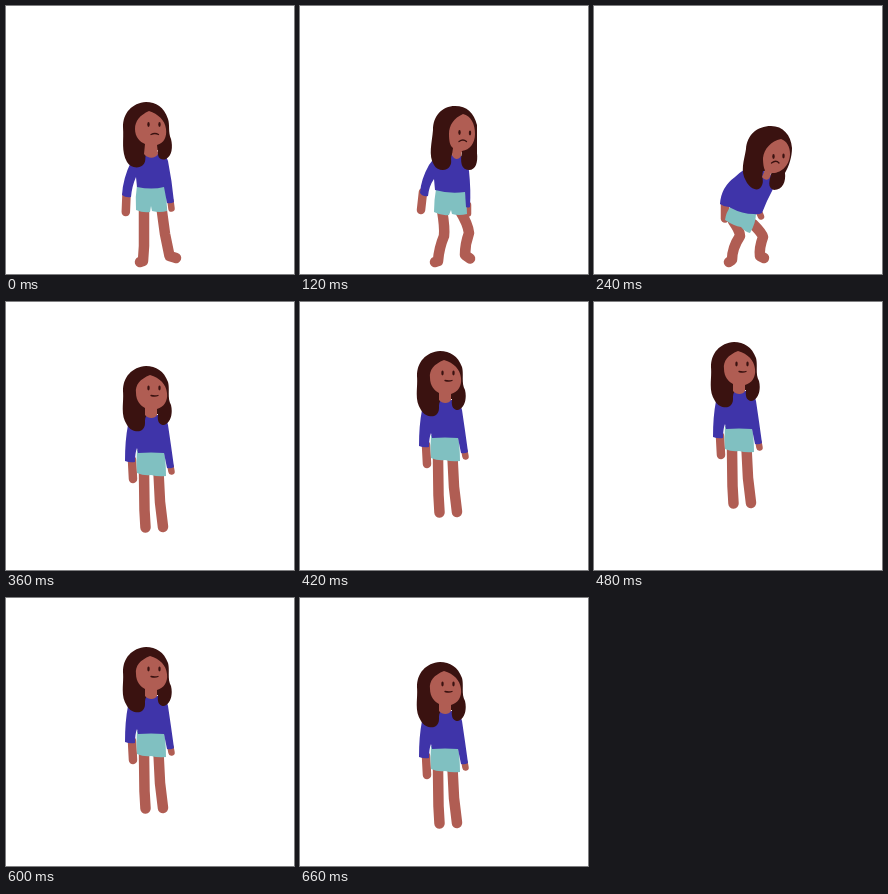
These frames come from a looping animation (288x268 px, 720 ms). An HTML page:

```html
<!DOCTYPE html>
<html lang="en">
<head>
<meta charset="utf-8">
<title>Jump</title>
<style>
  html, body { margin: 0; width: 100%; height: 100%; overflow: hidden; background: #fff; }
  svg { display: block; width: 100vw; height: 100vh; }
</style>
</head>
<body>
<svg id="stage" viewBox="0 0 288 268"></svg>
<script>
const SKIN = '#b05d53', HAIR = '#3a1210', SWEATER = '#3f34a9', SHORTS = '#80c0c1';
const LOOP = 720;

const poses = {
  stand: {
    legs: ['M138 202L138 240L137 255L134 256', 'M155.500 202L159 228L163.500 250L170 252'],
    hands: ['M120.500 189L119.800 206', 'M164.500 195L165.500 202.500'],
    shorts: 'M131 179L159 180Q161 192 161 205Q154 207 146 205L145 200L144 206Q137 207 130 204Q129 191 131 179Z',
    sweater: 'M139 146L152 146Q160 148 162 155Q166 175 168 196Q165 198 161 197L158 181Q146 184 131 181L130 171Q126 180 125 191Q120 192 116 189Q117 172 125 156Q131 148 139 146Z',
    hair: 'M140 96C126 97 117 107 117 121C118 135 115 145 121 156C124 162 133 163 137 159C141 155 138 151 141 146L152 144C151 151 154 155 160 153C166 150 167 141 165 133C162 126 164 119 162 113C158 101 150 96 140 96Z',
    face: 'M143 105C134 109 129 115 129 123C129 131 134 136 139 138L138 148C142 153 149 153 152 148L151 139C158 137 161 131 160 123C159 114 152 108 143 105Z',
    eyes: [142.5, 118.5, 153.5, 118.5],
    mouth: 'M145 128.500Q149 126.500 152.500 128.500'
  },
  dip: {
    legs: ['M142 204Q145 222 144 230Q139 242 138 255L135 256', 'M160 205Q168 218 169 227Q165 238 165 249L170 252.500'],
    hands: ['M123 186L121 204', 'M168 199L168 207.500'],
    shorts: 'M136 183L165 184Q167 196 167 208Q159 210 152 208L151 204L149 209Q141 210 134 206Q134 194 136 183Z',
    sweater: 'M150 149L162 150Q168 156 169 165Q171 184 170 201Q168 202 166 201L165 186Q149 188 135 184L134 173Q129 180 128 190Q123 191 120 187Q121 173 129 159Q135 149 150 149Z',
    hair: 'M155 100C142 100 133 110 133 124C132 137 128 149 134 159C137 165 147 166 150 160C153 155 149 153 153 147L162 146C160 155 161 164 169 164C176 164 178 156 177 147L177 119C174 107 167 100 155 100Z',
    face: 'M163 108C154 112 149 119 149 128C149 135 150 140 153 142L152 149C154 154 159 154 161 150L162 145C170 144 175 137 175 128C175 118 171 110 163 108Z',
    eyes: [159.5, 126.5, 170, 127],
    mouth: 'M159 135.500Q163 132.500 166.500 135.500'
  },
  crouch: {
    legs: ['M139 215Q146 225 146 230Q138 242 138 254L135 256', 'M159 218Q168 227 169 231Q165 242 166 250L170 252'],
    hands: ['M131 198L131 212.500', 'M165.500 207L167 210.500'],
    shorts: 'M137 200L162 207Q162 217 156 227Q151 226 147 221Q140 220 131 214Q132 206 137 200Z',
    sweater: 'M160 160L176 168Q181 174 179 183Q173 194 168 207Q164 209 160 208Q148 208 137 202L135 201Q130 201 126 198Q127 181 141 171Q150 162 160 160Z',
    hair: 'M177 120C163 120 153 129 152 143C150 155 146 165 152 175C156 183 164 186 167 181C171 175 167 172 169 165L178 165C175 175 173 182 180 184C189 184 192 175 191 167C195 160 198 151 198 142C197 129 189 120 177 120Z',
    face: 'M187 133C177 135 170 143 169 152C169 158 170 163 171 164L168 171C171 175 175 174 176 171L177 167C188 168 196 158 196 148C196 141 193 135 187 133Z',
    eyes: [179.5, 150.5, 189.5, 150],
    mouth: 'M177.500 157Q182 153.500 185 157'
  },
  air: {
    legs: ['M138 170L138.500 208L139.500 225.500', 'M152.500 170L154 200L157 225'],
    hands: ['M126 158L127 177', 'M164.500 164L165.500 169.500'],
    shorts: 'M131 148L158 149Q160 160 160 174Q152 175 145 173Q138 174 131 171Q130 160 131 148Z',
    sweater: 'M139 113L152 113Q161 115 162 123Q165 143 168 165Q165 167 161 166L158 151Q145 150 132 151L131 146Q129 151 129 160Q124 161 119 159Q119 138 122 123Q130 114 139 113Z',
    hair: 'M140 64C126 65 117 75 117 89C118 103 114 112 121 123C125 130 134 131 137 127C141 122 137 118 141 113L152 112C151 119 153 123 158 123C165 121 167 111 165 103C161 96 164 87 162 80C158 69 150 64 140 64Z',
    face: 'M144 73C134 77 129 83 130 91C130 99 135 104 139 106L139 113C142 117 149 117 151 113L151 107C158 105 162 99 161 91C160 82 154 76 144 73Z',
    eyes: [142.5, 86, 153.5, 86],
    mouth: 'M145 93.500Q149 94.500 152 93.500'
  }
};

// start time, pose, lift
const steps = [
  [0, 'stand', 0], [120, 'dip', 0], [240, 'crouch', 0],
  [360, 'air', 0], [420, 'air', 15], [480, 'air', 24],
  [600, 'air', 15], [660, 'air', 0]
];

const fill = (d, color) => `<path d="${d}" fill="${color}"/>`;
const line = (d, color, width) =>
  `<path d="${d}" fill="none" stroke="${color}" stroke-width="${width}" stroke-linecap="round" stroke-linejoin="round"/>`;
const eye = (x, y) => `<ellipse cx="${x}" cy="${y}" rx="1.2" ry="2.400" fill="${HAIR}"/>`;

function draw(p) {
  const [x1, y1, x2, y2] = p.eyes;
  return p.legs.map(d => line(d, SKIN, 10.5)).join('') +
    line(p.hands[0], SKIN, 8.5) + line(p.hands[1], SKIN, 6.5) +
    fill(p.shorts, SHORTS) + fill(p.sweater, SWEATER) +
    fill(p.hair, HAIR) + fill(p.face, SKIN) +
    eye(x1, y1) + eye(x2, y2) + line(p.mouth, HAIR, 1.3);
}

const stage = document.getElementById('stage');
const groups = {};
for (const name in poses) {
  const g = document.createElementNS('http://www.w3.org/2000/svg', 'g');
  g.innerHTML = draw(poses[name]);
  stage.append(g);
  groups[name] = g;
}

function render(time) {
  const t = time % LOOP;
  const [, pose, lift] = steps.filter(s => s[0] <= t).pop();
  for (const name in groups) groups[name].style.display = name === pose ? '' : 'none';
  groups[pose].setAttribute('transform', `translate(0 ${-lift})`);
}

function tick() {
  render(performance.now());
  requestAnimationFrame(tick);
}
tick();
</script>
</body>
</html>
```
